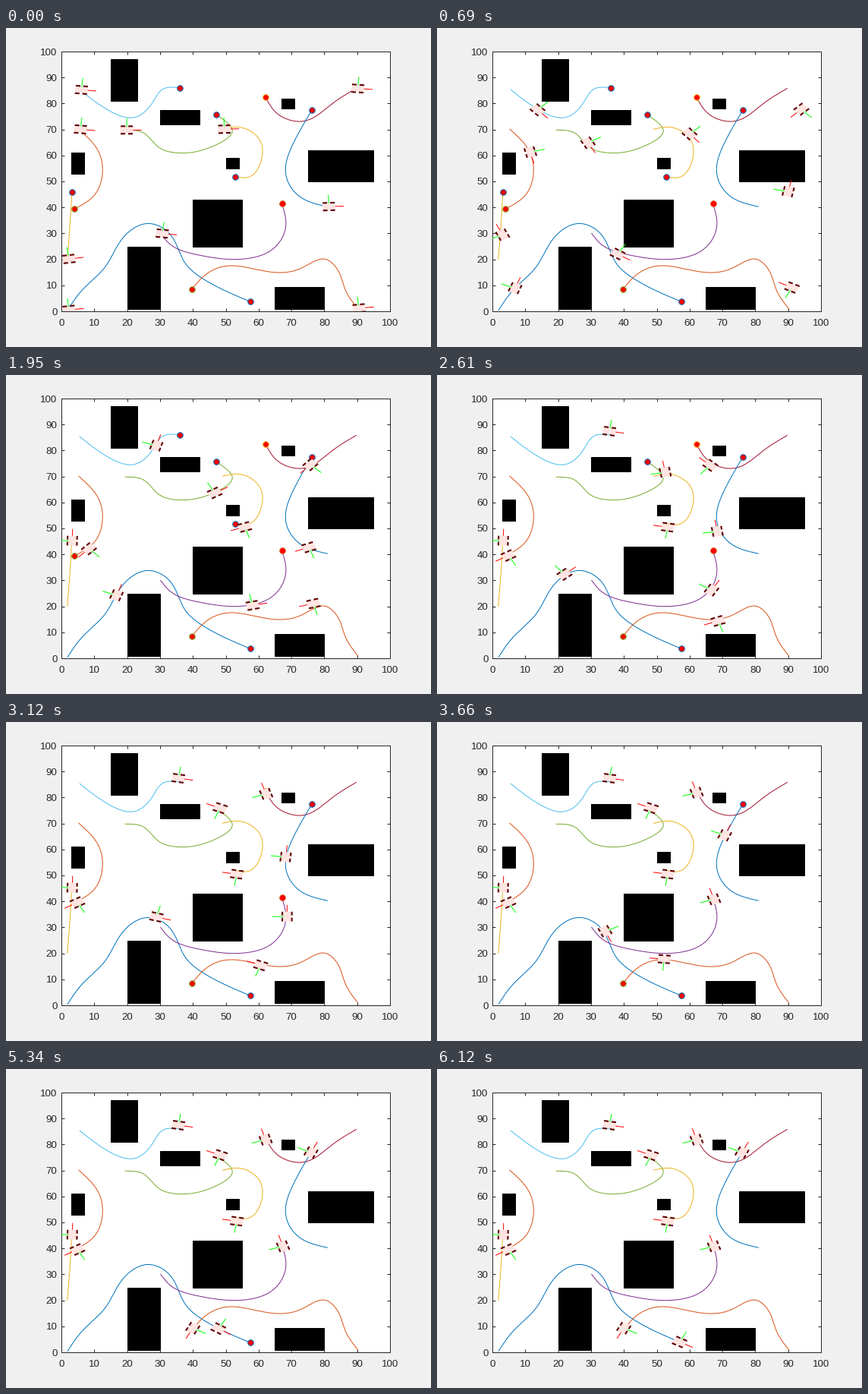
Recreate the animation shown at these times as a matplotlib script. Size 560 by 420 pixels, loop 7.68 s.

```python
import numpy as np
import matplotlib.pyplot as plt
from matplotlib.animation import FuncAnimation
from matplotlib.collections import LineCollection, PolyCollection
from matplotlib.patches import Rectangle

W, H, DPI = 560, 420, 100
PX = 72 / DPI                      # points per pixel
FRAMES, INTERVAL = 256, 30

GAIN = 0.135                       # turn rate per sine of the heading error
LOOKAHEAD = 2.5                    # distance of the steering point along the path
SEARCH = 6                         # how far ahead the nearest point may lie
ARRIVE = 1.0                       # distance left at which a robot stops

BLUE, ORANGE, YELLOW = "#0072BD", "#D95319", "#EDB120"
PURPLE, GREEN, CYAN, MAROON = "#7E2F8E", "#77AC30", "#4DBEEE", "#A2142F"
INK = "#262626"

plt.rcParams["font.family"] = "Liberation Sans"


def spline(pts, n=500):
    """Natural cubic spline through pts, sampled at n places."""
    p = np.array(pts, float)
    h = np.hypot(*np.diff(p, axis=0).T)
    t = np.r_[0, np.cumsum(h)]
    m = len(p)
    a, b = np.eye(m), np.zeros((m, 2))
    for i in range(1, m - 1):
        a[i, i - 1:i + 2] = h[i - 1], 2 * (h[i - 1] + h[i]), h[i]
        b[i] = 6 * ((p[i + 1] - p[i]) / h[i] - (p[i] - p[i - 1]) / h[i - 1])
    c = np.linalg.solve(a, b)
    x = np.linspace(0, t[-1], n)
    k = np.clip(np.searchsorted(t, x) - 1, 0, m - 2)
    hk = h[k][:, None]
    u = (x - t[k])[:, None] / hk
    v = 1 - u
    return v * p[k] + u * p[k + 1] + hk**2 / 6 * ((v**3 - v) * c[k] + (u**3 - u) * c[k + 1])


class Robot:
    """Starts facing right and steers along its path until it reaches the goal."""

    def __init__(self, color, edge, waypoints, speed=0.485):
        self.color, self.edge = color, edge
        self.path = spline(waypoints)
        self.poses = self.drive(speed)
        self.stop = len(self.poses) - 1

    def drive(self, speed):
        path = self.path
        s = np.r_[0, np.cumsum(np.hypot(*np.diff(path, axis=0).T))]
        (x, y), angle, near = path[0], 0.0, 0
        poses = []
        while s[near] < s[-1] - ARRIVE and len(poses) < FRAMES:
            tx, ty = path[min(np.searchsorted(s, s[near] + LOOKAHEAD), len(s) - 1)]
            angle += GAIN * np.sin(np.arctan2(ty - y, tx - x) - angle)
            x += speed * np.cos(angle)
            y += speed * np.sin(angle)
            poses.append((x, y, angle))
            ahead = path[near:np.searchsorted(s, s[near] + SEARCH)]
            near += np.argmin(np.hypot(ahead[:, 0] - x, ahead[:, 1] - y))
        return poses

    def pose(self, frame):
        return self.poses[min(frame, self.stop)]


robots = [
    Robot(BLUE, BLUE, [(1.9, .5), (6.2, 8), (13.2, 16.9), (20, 30), (26.5, 33.8),
                       (32, 31), (37.8, 18.3), (44, 11.8), (57.5, 3.7)], speed=0.44),
    Robot(ORANGE, GREEN, [(90.1, 1.1), (86.5, 8), (83.9, 16.3), (80.2, 20.1), (73, 16.6),
                          (63.9, 15.1), (49, 17.2), (45, 15.1), (39.7, 8.4)]),
    Robot(YELLOW, BLUE, [(1.8, 20.1), (2.6, 33), (3.2, 45.8)]),
    Robot(PURPLE, ORANGE, [(30.2, 30), (33.5, 25.4), (42, 21.6), (53.5, 20),
                           (63.5, 23.2), (68.3, 33), (67.1, 41.4)]),
    Robot(GREEN, BLUE, [(19.4, 69.8), (24.5, 69), (30, 62.8), (35.3, 61),
                        (46.6, 63.8), (52, 69.2), (47.1, 75.7)]),
    Robot(CYAN, BLUE, [(5.6, 85.3), (13, 78.4), (22, 74.6), (27.7, 80.3),
                       (31.3, 85.8), (36, 86.1)]),
    Robot(MAROON, YELLOW, [(89.7, 85.8), (82.5, 80), (73, 73.1), (66.2, 75.6), (62.1, 82.6)]),
    Robot(BLUE, BLUE, [(80.9, 40.3), (73.3, 43.5), (68.4, 52), (70.5, 64.5), (76.3, 77.6)]),
    Robot(ORANGE, GREEN, [(5.3, 70.1), (11, 62.2), (12.4, 52), (9.6, 44.1), (4, 39.4)]),
    Robot(YELLOW, BLUE, [(49.1, 70.1), (54, 70.9), (59.5, 67.4), (60.9, 58.5),
                         (56.5, 51.5), (52.8, 51.9)]),
]

# left, bottom, right, top
obstacles = [(15, 81, 23, 97), (30, 72, 42, 77.5), (40, 25, 55, 43),
             (20, 1, 30, 25), (65, 1, 80, 9.5), (75, 50, 95, 62),
             (67, 78, 71, 82), (50, 55, 54, 59), (3, 53, 7, 61)]

fig = plt.figure(figsize=(W / DPI, H / DPI), dpi=DPI, facecolor="#F0F0F0")
ax = fig.add_axes([73 / W, 47 / H, 433 / W, 342 / H])
ax.set(xlim=(0, 100), ylim=(0, 100),
       xticks=range(0, 101, 10), yticks=range(0, 101, 10))
ax.tick_params(direction="in", length=4.4 * PX, width=PX, color=INK, labelcolor=INK,
               labelsize=13.33 * PX, top=True, right=True)
ax.tick_params(axis="x", pad=10 * PX)
ax.tick_params(axis="y", pad=5.5 * PX)
for side in ax.spines.values():
    side.set(color=INK, linewidth=PX)

for x0, y0, x1, y1 in obstacles:
    ax.add_patch(Rectangle((x0, y0), x1 - x0, y1 - y0, fc="k", ec="k", lw=PX))

goals = []
for r in robots:
    ax.plot(*r.path.T, color=r.color, lw=PX, zorder=2)
    goals += ax.plot(*r.path[-1], "o", ms=7.6 * PX, mfc="r", mec=r.edge,
                     mew=PX, zorder=3)

# Robot parts in its own frame, heading along +x
AXIS = 4.5
HEAD = np.array([(0, 0), (AXIS, 0)])
LEFT = np.array([(0, 0), (0, AXIS)])
BODY = np.array([(-1.9, -1.15), (1.9, -1.15), (1.9, 1.15), (-1.9, 1.15)])
WHEELS = [np.array([(x - .7, y), (x + .7, y)]) for x in (-1.15, 1.15) for y in (-1.45, 1.45)]


def lines(color, width, z):
    return ax.add_collection(LineCollection([], colors=color, linewidths=width * PX,
                                            zorder=z, capstyle="butt"))


heads, lefts = lines("#FF0000", 1, 4), lines("#00FF00", 1, 4)
bodies = ax.add_collection(PolyCollection([], facecolors="#FFE4E1", edgecolors="none", zorder=5))
wheels = lines("#600000", 2.1, 6)


def place(shape, pose):
    x, y, a = pose
    c, s = np.cos(a), np.sin(a)
    return shape @ np.array([(c, s), (-s, c)]) + (x, y)


def draw(frame):
    poses = [r.pose(frame) for r in robots]
    heads.set_segments([place(HEAD, p) for p in poses])
    lefts.set_segments([place(LEFT, p) for p in poses])
    bodies.set_verts([place(BODY, p) for p in poses])
    wheels.set_segments([place(w, p) for p in poses for w in WHEELS])
    for r, goal in zip(robots, goals):
        goal.set_visible(frame < r.stop)
    return [*goals, heads, lefts, bodies, wheels]


anim = FuncAnimation(fig, draw, frames=FRAMES, interval=INTERVAL,
                     init_func=lambda: draw(0), repeat=True, repeat_delay=0, blit=True)
plt.show()
```
